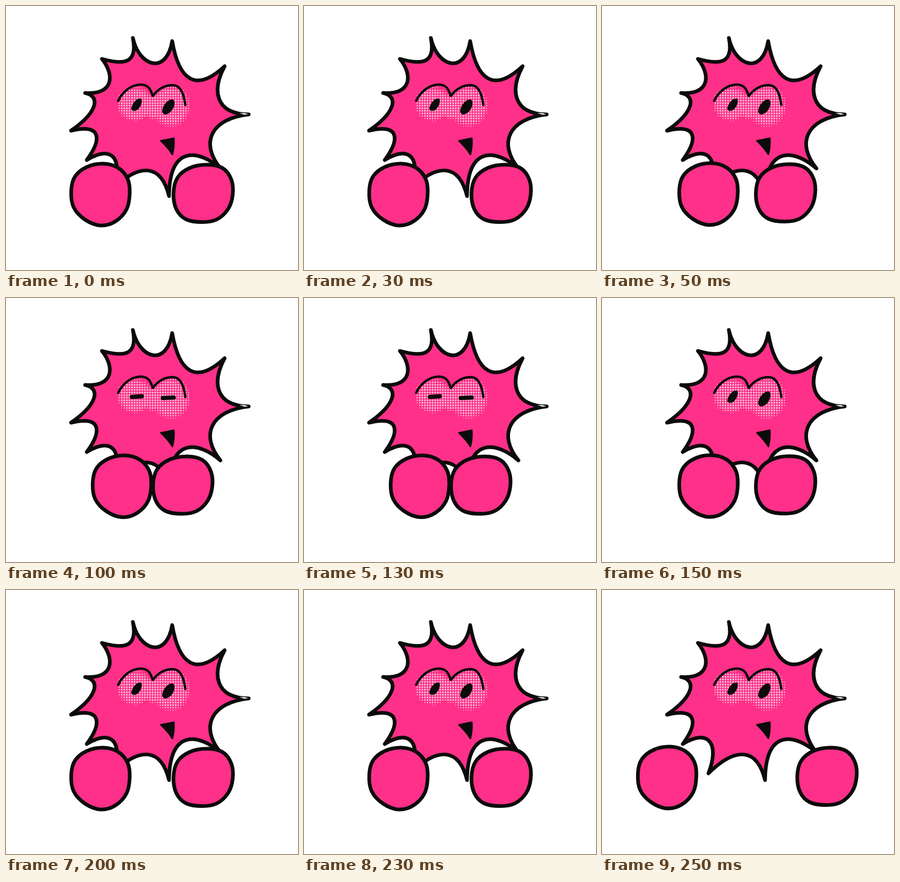
Write an HTML page that moves like this. It is 557 by 504 pixels and loops after 0.3 s.

```html
<!DOCTYPE html>
<html lang="en">
<head>
<meta charset="utf-8">
<title>Clapping star</title>
<style>
  html, body { margin: 0; width: 100%; height: 100%; overflow: hidden; background: #fff; }
  svg { display: block; width: 100vw; height: 100vh; }
  .shape { fill: #ff3089; stroke: #0b0b0b; stroke-width: 7; stroke-linejoin: round; }
  .line { fill: none; stroke: #0b0b0b; stroke-width: 4.6; stroke-linecap: round; stroke-linejoin: round; }
  .ink { fill: #0b0b0b; }
  .lid { stroke-width: 8; }
</style>
</head>
<body>
<svg viewBox="0 0 557 504">
  <path class="shape" d="M242 61
    C254 116 306 132 317 67
    C330 142 362 166 417 115
    C393 160 398 206 463 207
    C390 215 370 262 409 310
    C370 276 312 262 311 363
    C296 302 256 298 203 350
    C224 297 206 262 154 294
    C182 256 184 224 124 238
    C176 202 180 172 151 166
    C205 170 208 132 183 101
    C222 112 252 112 242 61Z"/>
  <path fill="#fff" d="M445 204.5L455 204.5L462 206.5L455 207.5Z"/>
  <path id="dots" fill="#fbc3da"/>
  <path class="line" d="M214 181C224 160 242 150 258 150C273 151 276 160 280 172C290 158 303 151 319 151C335 152 340 172 342 189"/>
  <g id="open" class="ink">
    <path d="M258 177C250 174 240 187 239 196C240 202 248 201 252 197C258 191 261 181 258 177Z"/>
    <path d="M319 179C310 176 298 190 298 201C299 209 307 208 313 203C321 196 324 183 319 179Z"/>
  </g>
  <path id="shut" class="line lid" d="M240 189L259 187.5M299 191L320 190"/>
  <path class="ink" stroke="#0b0b0b" stroke-width="3" stroke-linejoin="round" d="M295.500 257.500L320 252.500Q321.500 268 317.500 283.500Q308 269 295.500 257.500Z"/>
  <path id="left" class="shape"/>
  <path id="right" class="shape"/>
</svg>
<script>
  const get = id => document.getElementById(id);
  const STEP = 50;
  // Hand offsets per step: left x, right x, shared y
  const poses = [[0, 0, 0], [23, -26, -1], [41, -39, -0.5], [23, -26, -1], [0, 0, 0], [-56, 53, -2]];

  // Smooth closed curve through the given points
  function loop(pts) {
    const n = pts.length;
    const at = i => pts[(i + n) % n];
    const lean = (p, a, b) => p.map((v, k) => (v + (b[k] - a[k]) / 6).toFixed(1));
    let d = 'M' + pts[0];
    for (let i = 0; i < n; i++) {
      const p = at(i), q = at(i + 1);
      d += `C${lean(p, at(i - 1), q)} ${lean(q, at(i + 2), p)} ${q}`;
    }
    return d + 'Z';
  }

  // Halftone cheeks: dots shrink towards the rim of three merged ovals
  function halftone() {
    const ovals = [[246, 187, 35, 33], [314, 191, 38, 40], [280, 192, 20, 24]];
    const pitch = 4.9;
    let d = '';
    for (let y = 156; y < 232; y += pitch) {
      for (let x = 211; x < 354; x += pitch) {
        const rim = Math.min(...ovals.map(([cx, cy, rx, ry]) => Math.hypot((x - cx) / rx, (y - cy) / ry)));
        if (rim > 1) continue;
        const r = Math.min(1.75, 0.8 + (1 - rim) * 4);
        d += `M${(x - r).toFixed(2)} ${y.toFixed(2)}a${r} ${r} 0 1 0 ${2 * r} 0a${r} ${r} 0 1 0 ${-2 * r} 0`;
      }
    }
    return d;
  }

  get('dots').setAttribute('d', halftone());
  get('left').setAttribute('d', loop([
    [186, 301], [214, 309], [232, 330], [236, 357], [230, 388], [209, 411],
    [181, 419], [151, 408], [129, 384], [124.5, 352], [132, 325], [155, 307]
  ]));
  get('right').setAttribute('d', loop([
    [385, 303], [414, 310], [430, 332], [432.5, 360], [424, 387], [403, 407],
    [375, 412.5], [343, 407], [325, 388], [319.5, 358], [327, 328], [351, 309]
  ]));

  function draw(time) {
    const step = Math.floor(time / STEP) % poses.length;
    const [lx, rx, y] = poses[step];
    const blink = step === 2;
    get('left').setAttribute('transform', `translate(${lx} ${y})`);
    get('right').setAttribute('transform', `translate(${rx} ${y})`);
    get('open').style.display = blink ? 'none' : '';
    get('shut').style.display = blink ? '' : 'none';
  }

  function tick() {
    draw(performance.now());
    requestAnimationFrame(tick);
  }
  draw(0);
  requestAnimationFrame(tick);
</script>
</body>
</html>
```
